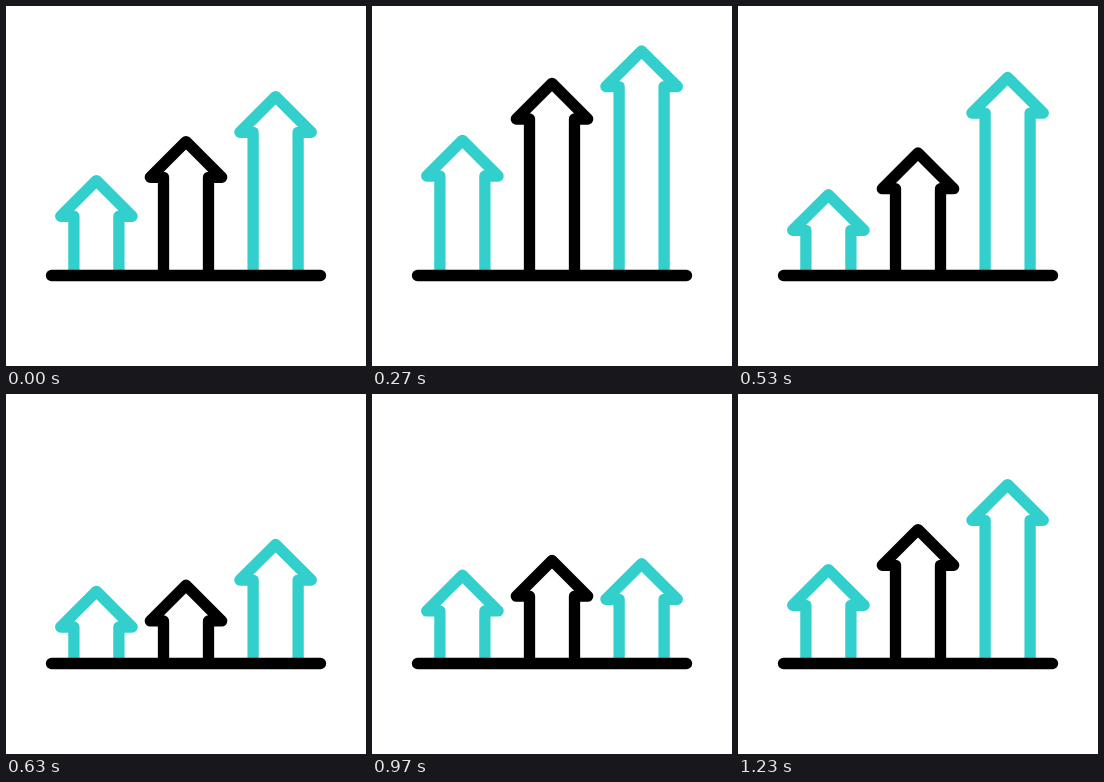
Animation of 360 by 360 pixels, one loop 1.4 s. Source, as an HTML page:

```html
<!DOCTYPE html>
<html lang="en">
<head>
<meta charset="utf-8">
<title>Rising arrows</title>
<style>
  html, body { margin: 0; width: 100%; height: 100%; overflow: hidden; background: #fff; }
  svg { display: block; width: 100vw; height: 100vh; }
  path { fill: none; stroke-width: 11.3; stroke-linecap: round; stroke-linejoin: round; }
</style>
</head>
<body>
<svg viewBox="0 0 360 360">
  <path class="arrow" stroke="#33cfcc"/>
  <path class="arrow" stroke="#000"/>
  <path class="arrow" stroke="#33cfcc"/>
  <path stroke="#000" d="M45.5 269.5H314.5"/>
</svg>
<script>
const STEP = 100 / 3, STEPS = 42, BASE = 269;
const HALF_HEAD = 35.7, HALF_SHAFT = 22.5, LOW = 197.3;
const STAGGER = 2, LEAD = 0.8;

const arrows = [
  { x: 90.4, rest: 175.6, peak: 134.3 },
  { x: 180, rest: 135.6, peak: 71.6 },
  { x: 269.6, rest: 90.6, peak: 16.1 },
];
const paths = document.querySelectorAll('.arrow');

// Smooth progress from 0 to 1 between two moments, held outside them
function ease(time, start, end) {
  const u = Math.min(1, Math.max(0, (time - start) / (end - start)));
  return u * u * (3 - 2 * u);
}

// Stretch up, drop down, then settle back to rest
function tipAt({ rest, peak }, time) {
  return rest
    + (peak - rest) * ease(time, 0, 8.33)
    + (LOW - peak) * ease(time, 9.13, 19.13)
    + (rest - LOW) * ease(time, 21.8, 33.8);
}

function outline(x, tip) {
  const barb = tip + HALF_HEAD;
  return `M${x - HALF_SHAFT} ${BASE}V${barb}H${x - HALF_HEAD}L${x} ${tip}` +
    `L${x + HALF_HEAD} ${barb}H${x + HALF_SHAFT}V${BASE}`;
}

function draw(ms) {
  // The motion advances in steps of 1/30 s
  const step = Math.floor((ms + 3.4) / STEP) % STEPS;
  arrows.forEach((arrow, i) => {
    const time = (step + LEAD - STAGGER * i + STEPS) % STEPS;
    paths[i].setAttribute('d', outline(arrow.x, tipAt(arrow, time)));
  });
}

const begin = performance.now();
function tick() {
  draw(performance.now() - begin);
  requestAnimationFrame(tick);
}
tick();
</script>
</body>
</html>
```
